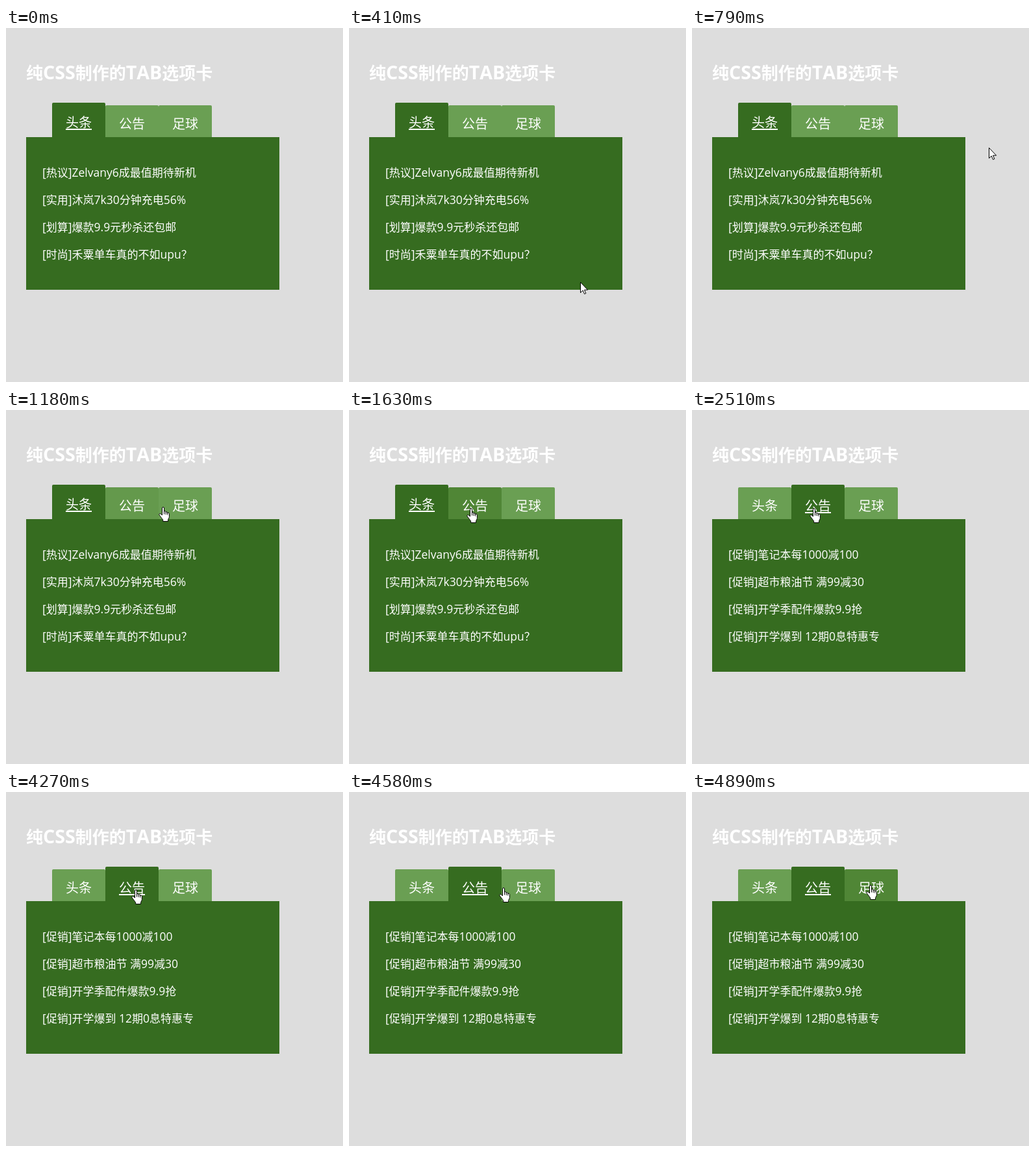
Recreate the animation shown at these times as an HTML page. Size 519 px wide and 545 px high, loop 8000 ms.

```html
<!DOCTYPE html>
<html lang="zh-CN">
<head>
<meta charset="utf-8">
<title>纯CSS制作的TAB选项卡</title>
<style>
  html, body { margin: 0; width: 100%; height: 100%; overflow: hidden; background: #ddd; }
  svg { display: block; width: 519px; height: 545px; }
  text { fill: #fff; font: 500 17px "Noto Sans CJK SC", "Noto Sans CJK", sans-serif; font-kerning: none; white-space: pre; }
  .latin { font-family: "Open Sans", "Noto Sans", sans-serif; font-size: 1.03em; }
  .title { font-size: 26px; font-weight: 700; }
  .title .latin { font-size: 1.1em; }
  .label { font-size: 20px; }
</style>
</head>
<body>
<svg id="stage" viewBox="0 0 519 545" xmlns="http://www.w3.org/2000/svg"></svg>
<script>
const LOOP = 8000, FRAME = 78;
const ENTER = 70, HAND = 1100, CLICK = 2260;
const IDLE = [106, 159, 83], HOVER = [80, 134, 54], ACTIVE = [54, 108, 32];
const LABELS = ['头条', '公告', '足球'];
const LISTS = [
  ['[热议]Zelvany6成最值期待新机', '[实用]沐岚7k30分钟充电56%', '[划算]爆款9.9元秒杀还包邮', '[时尚]禾粟单车真的不如upu？'],
  ['[促销]笔记本每1000减100', '[促销]超市粮油节 满99减30', '[促销]开学季配件爆款9.9抢', '[促销]开学爆到 12期0息特惠专']
];

// Each glide follows a Bezier curve, then the pointer rests at its end
const GLIDES = [
  { start: ENTER, end: 180, curve: [[303, 490], [239, 451]] },
  { start: 330, end: HAND, curve: [[239, 451], [700, 240], [407, 130], [297, 139]] },
  { start: 1180, end: 1420, curve: [[235, 149], [185, 153], [178, 150]] },
  { start: 1630, end: 1630, curve: [[181, 151]] },
  { start: 4270, end: 4890, curve: [[193, 150], [268, 143]] }
];

const stage = document.getElementById('stage');

function add(tag, attrs, parent = stage) {
  const node = document.createElementNS('http://www.w3.org/2000/svg', tag);
  for (const key in attrs) node.setAttribute(key, attrs[key]);
  parent.appendChild(node);
  return node;
}

function addText(content, attrs, parent) {
  const node = add('text', attrs, parent);
  for (const run of content.match(/[ -~]+|[^ -~]+/g)) {
    add('tspan', /[ -~]/.test(run) ? { class: 'latin' } : {}, node).textContent = run;
  }
  return node;
}

const rgb = c => `rgb(${c.map(Math.round)})`;
const mix = (a, b, k) => a.map((v, i) => v + (b[i] - v) * k);
const show = (node, visible) => { node.style.display = visible ? '' : 'none'; };

// Progress from 0 to 1, held for one frame at a time
function progress(t, start, end) {
  if (t >= end) return 1;
  if (t < start) return 0;
  const steps = Math.max(1, Math.round((end - start) / FRAME));
  return Math.floor((t - start) / (end - start) * steps + 0.1) / steps;
}

function bezier(points, k) {
  if (points.length === 1) return points[0];
  return bezier(points.slice(1).map((p, i) => mix(points[i], p, k)), k);
}

addText('纯CSS制作的TAB选项卡', { class: 'title', x: 31, y: 79 });

const tabs = LABELS.map((label, i) => {
  const x = 71 + 82 * i;
  return {
    x,
    shape: add('path', {}),
    text: addText(label, { class: 'label', x: x + 21 }),
    line: add('rect', { x: x + 21, width: 40, height: 2, fill: '#fff' })
  };
});

add('rect', { x: 31, y: 168, width: 390, height: 235, fill: rgb(ACTIVE) });
const lists = LISTS.map(items => {
  const group = add('g', {});
  items.forEach((item, i) => addText(item, { x: 56, y: 229 + 42 * i }, group));
  return group;
});

const ink = { fill: '#fff', stroke: '#000', 'stroke-linejoin': 'round' };
const arrow = add('path', { ...ink, d: 'M.5 .5V16.5L4.2 13 6.6 18.5 8.9 17.5 6.5 12.2H11.6Z' });
const hand = add('g', {});
add('path', { ...ink, d: 'M5.5 13V2.1a1.5 1.5 0 0 1 3 0V7.4c.3-1.2 2.7-1.1 2.7.4V8.6c.3-1.1 2.6-1 2.6.4V9.8c.4-1 2.6-.8 2.6.8V15.4c0 2-1.7 3.2-1.9 5V22.5H6.7V20.3C5.6 18.2 2.8 15.2 1.2 12.7 0 10.9 2.3 9.7 3.8 11.3Z' }, hand);
add('path', { fill: 'none', stroke: '#000', d: 'M8.5 7V11.5M11.2 8V12M13.8 9V12.5' }, hand);

function drawTab({ x, shape, text, line }, { hover = 0, active = 0, lift = 0, underlined = false }) {
  const top = 119 - 4 * active, base = 155 - lift;
  shape.setAttribute('d', `M${x} 168V${top + 2}q0-2 2-2h78q2 0 2 2V168Z`);
  shape.setAttribute('fill', rgb(mix(mix(IDLE, HOVER, hover), ACTIVE, active)));
  text.setAttribute('y', base);
  line.setAttribute('y', base + 2);
  show(line, underlined);
}

function drawPointer(t) {
  const glide = GLIDES.filter(g => t >= g.start).pop();
  show(arrow, glide && t < HAND);
  show(hand, t >= HAND);
  if (!glide) return;
  const [x, y] = bezier(glide.curve, progress(t, glide.start, glide.end)).map(Math.round);
  for (const node of [arrow, hand]) node.setAttribute('transform', `translate(${x} ${y})`);
}

function render(t) {
  const clicked = t >= CLICK;
  const swap = progress(t, CLICK, CLICK + 250);
  drawTab(tabs[0], { active: 1 - swap, lift: 2 * (1 - swap), underlined: !clicked });
  drawTab(tabs[1], { hover: progress(t, HAND, 1420), active: swap, underlined: clicked });
  drawTab(tabs[2], { hover: progress(t, 4580, 4890) });
  lists.forEach((list, i) => show(list, clicked === (i === 1)));
  drawPointer(t);
}

const start = performance.now();
function tick() {
  render((performance.now() - start) % LOOP);
  requestAnimationFrame(tick);
}
tick();
</script>
</body>
</html>
```
